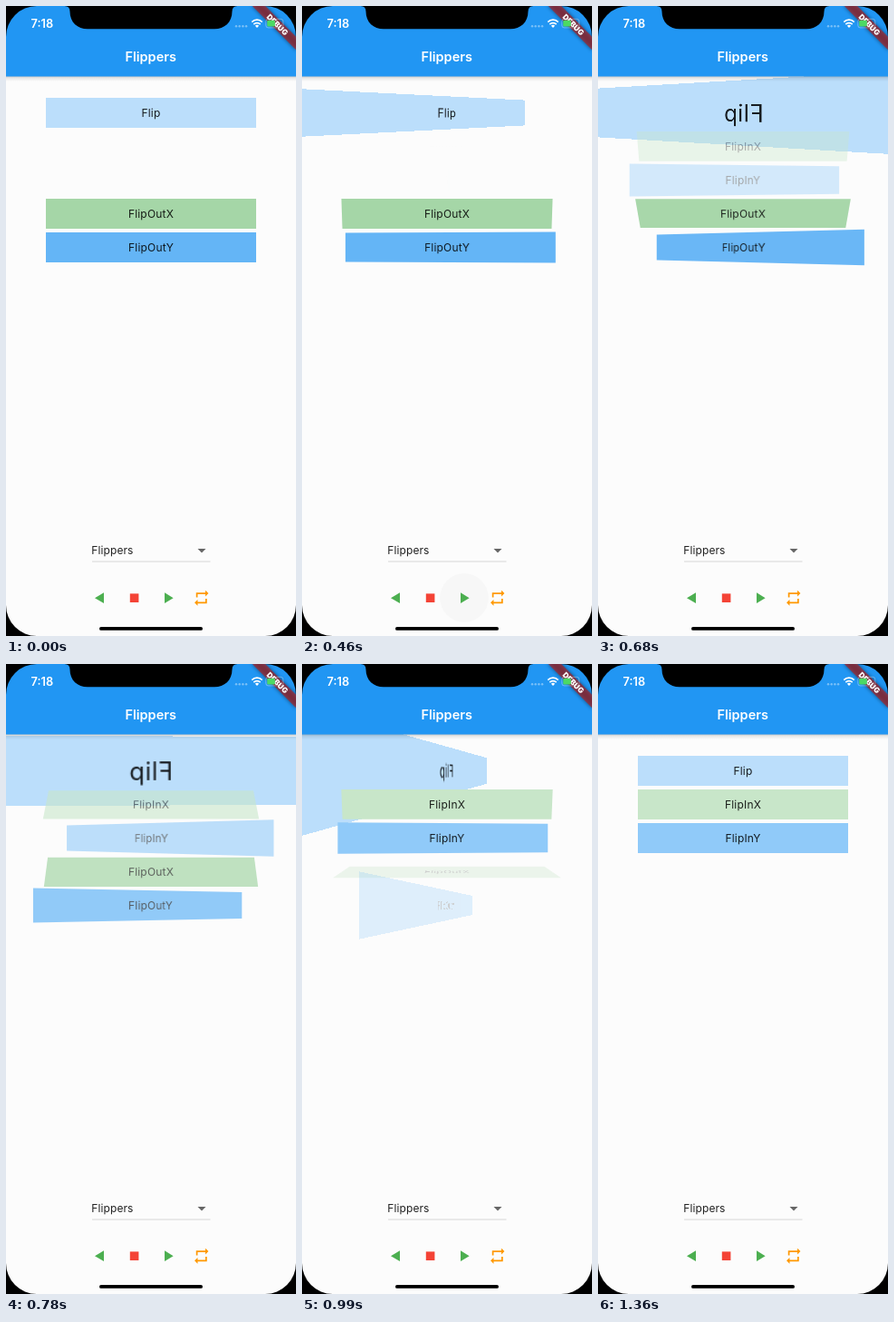
Animation, 320 px wide and 693 px high, one loop 1.41 s. Source, as an HTML page:

```html
<!DOCTYPE html>
<html lang="en">
<head>
<meta charset="utf-8">
<title>Flippers</title>
<style>
  html, body { margin: 0; width: 100%; height: 100%; overflow: hidden; background: #fcfcfc; }
  #stage { position: relative; width: 320px; height: 693px; overflow: hidden;
    background: #fcfcfc; font-family: Inter, Roboto, sans-serif; }
  .box { position: absolute; left: 44px; width: 232px; height: 33px; line-height: 33px;
    text-align: center; font-size: 12px; letter-spacing: .2px; color: rgba(0,0,0,.87); }
  svg { position: absolute; left: 0; top: 0; }
</style>
</head>
<body>
<div id="stage">
  <div id="boxes"></div>
  <svg width="320" height="693" viewBox="0 0 320 693">
    <defs>
      <linearGradient id="shade" x2="0" y2="1">
        <stop offset="0" stop-opacity=".22"/>
        <stop offset=".4" stop-opacity=".08"/>
        <stop offset="1" stop-opacity="0"/>
      </linearGradient>
      <filter id="blur" x="-20%" y="-80%" width="140%" height="260%">
        <feGaussianBlur stdDeviation="2"/>
      </filter>
    </defs>

    <!-- app bar -->
    <rect y="77" width="320" height="6" fill="url(#shade)"/>
    <rect width="320" height="77.5" fill="#2196f3"/>
    <text x="159.7" y="61.2" text-anchor="middle" font-size="14.5" font-weight="600" fill="#fff">Flippers</text>

    <!-- debug ribbon -->
    <g transform="translate(320 0) rotate(45)">
      <rect x="-34.1" y="23.9" width="68.3" height="10.2" opacity=".5" filter="url(#blur)"/>
      <rect x="-34.1" y="23.9" width="68.3" height="10.2" fill="#b71c1c" fill-opacity=".63"/>
      <text y="32.1" text-anchor="middle" font-size="8.4" font-weight="900" fill="#fff">DEBUG</text>
    </g>

    <!-- status bar -->
    <text x="27.5" y="23.8" font-size="12.8" font-weight="600" fill="#fff">7:18</text>
    <g fill="#fff" fill-opacity=".4">
      <circle cx="254" cy="22.3" r="1.2"/><circle cx="257.7" cy="22.3" r="1.2"/>
      <circle cx="261.4" cy="22.3" r="1.2"/><circle cx="265.1" cy="22.3" r="1.2"/>
    </g>
    <g fill="none" stroke="#fff" stroke-width="1.7">
      <path d="M271.3 17.6a8 8 0 0 1 11.4 0"/>
      <path d="M273.3 20.1a5.2 5.2 0 0 1 7.4 0"/>
    </g>
    <path d="M277 24l-2.1-2.2a3 3 0 0 1 4.2 0z" fill="#fff"/>
    <rect x="286.8" y="14.3" width="19" height="9.6" rx="2.6" fill="none" stroke="#fff" stroke-opacity=".35"/>
    <rect x="288.2" y="15.7" width="8.6" height="6.8" rx="1.2" fill="#4cd964"/>

    <!-- dropdown -->
    <text x="94.3" y="603.3" font-size="12" letter-spacing=".1" fill-opacity=".87">Flippers</text>
    <path d="M211.5 597h9l-4.5 4.4z" fill="#666"/>
    <rect x="95" y="610.6" width="130.5" height=".9" fill="#d2d2d2"/>

    <!-- controls -->
    <circle id="ripple" cx="179" cy="651" r="27"/>
    <path d="M108 645.3v11.8l-10-5.9z" fill="#4caf50"/>
    <rect x="136.8" y="646.4" width="9.6" height="9.6" fill="#f44336"/>
    <path d="M175 645.3v11.8l9.6-5.9z" fill="#4caf50"/>
    <path transform="translate(205.5 641) scale(.853)" fill="#ff9800"
      d="M7 7h10v3l4-4-4-4v3H5v6h2V7zm10 10H7v-3l-4 4 4 4v-3h12v-6h-2v4z"/>

    <!-- phone outline -->
    <rect x="103" y="683" width="114" height="3.8" rx="1.9"/>
    <path d="M64.5 0q6 0 6 6C70.5 18 79 25.3 90 25.3H230C241 25.3 249.5 18 249.5 6q0-6 6-6z"/>
    <path fill-rule="evenodd" d="M0 0H320V693H0zM34 0A34 34 0 0 0 0 34V659A34 34 0 0 0 34 693H286A34 34 0 0 0 320 659V34A34 34 0 0 0 286 0z"/>
  </svg>
</div>
<script>
const LOOP = 1410, START = 340, DURATION = 1000;

// The picture is held between these moments.
const STEPS = [0, 320, 370, 420, 470, 530, 570, 630, 680, 730, 780, 840, 890,
  940, 990, 1040, 1090, 1140, 1210, 1260, 1310, 1360];

function bezier(x1, y1, x2, y2) {
  const at = (a, b, t) => 3 * a * t * (1 - t) ** 2 + 3 * b * t * t * (1 - t) + t ** 3;
  return x => {
    let lo = 0, hi = 1;
    for (let i = 0; i < 24; i++) {
      const mid = (lo + hi) / 2;
      if (at(x1, x2, mid) < x) lo = mid; else hi = mid;
    }
    return at(y1, y2, (lo + hi) / 2);
  };
}
const ease = bezier(.25, .1, .25, 1);
const easeIn = bezier(.42, 0, 1, 1);
const easeOut = bezier(0, 0, .58, 1);

// Keys are [position, value, easing towards the next key].
function track(...keys) {
  return p => {
    const i = keys.findIndex(key => key[0] > p);
    if (i < 0) return keys[keys.length - 1][1];
    const [p0, v0, curve] = keys[i - 1], [p1, v1] = keys[i];
    return v0 + (v1 - v0) * curve((p - p0) / (p1 - p0));
  };
}

const spin = track([0, -360, easeOut], [.4, -190, easeOut], [.5, -170, easeIn], [.8, 0, easeIn]);
const lift = track([0, 0, easeOut], [.4, 110, easeOut], [.5, 110, easeIn], [.8, 0, easeIn]);
const shrink = track([0, 1, easeIn], [.5, 1, easeIn], [.8, .95, easeIn], [1, 1, easeIn]);
const swingIn = track([0, 90, easeIn], [.4, -20, easeIn], [.6, 10, ease], [.8, -5, ease], [1, 0, ease]);
const fadeIn = track([0, 0, easeIn], [.6, 1, easeIn]);
const swingOut = track([0, 0, ease], [.3, -20, ease], [1, 90, ease]);
const fadeOut = track([0, 1, ease], [.3, 1, ease], [1, 0, ease]);
const solid = () => 1;

const boxes = [
  ['Flip', '#bbdefb', solid, p => `scale(${shrink(p)}) translateZ(${lift(p)}px) rotateY(${spin(p)}deg)`],
  ['FlipInX', '#c8e6c9', fadeIn, p => `rotateX(${-swingIn(p)}deg)`],
  ['FlipInY', '#90caf9', fadeIn, p => `rotateY(${swingIn(p)}deg)`],
  ['FlipOutX', '#a5d6a7', fadeOut, p => `rotateX(${swingOut(p)}deg)`],
  ['FlipOutY', '#64b5f6', fadeOut, p => `rotateY(${swingOut(p)}deg)`]
].map(([label, color, opacity, pose], i) => {
  const el = document.createElement('div');
  el.className = 'box';
  el.textContent = label;
  el.style.background = color;
  el.style.top = 100.5 + 37.1 * i + 'px';
  document.getElementById('boxes').append(el);
  return { el, opacity, pose };
});
const ripple = document.getElementById('ripple');

function draw(time) {
  const t = STEPS.filter(step => step <= time).pop();
  const lag = Math.max(0, 718 - t) * .13; // slow start
  const p = Math.min(1, Math.max(0, (t - START - lag) / DURATION));
  const resting = p === 0 || p === 1;
  for (const { el, opacity, pose } of boxes) {
    el.style.opacity = opacity(p);
    el.style.transform = resting ? 'none' : `perspective(194px) ${pose(p)}`;
  }
  const pressed = t >= 320 && t < 680;
  ripple.setAttribute('fill-opacity', pressed ? .022 - .012 * (t - 320) / 360 : 0);
}

const origin = performance.now();
function tick() {
  draw((performance.now() - origin) % LOOP);
  requestAnimationFrame(tick);
}
tick();
</script>
</body>
</html>
```
